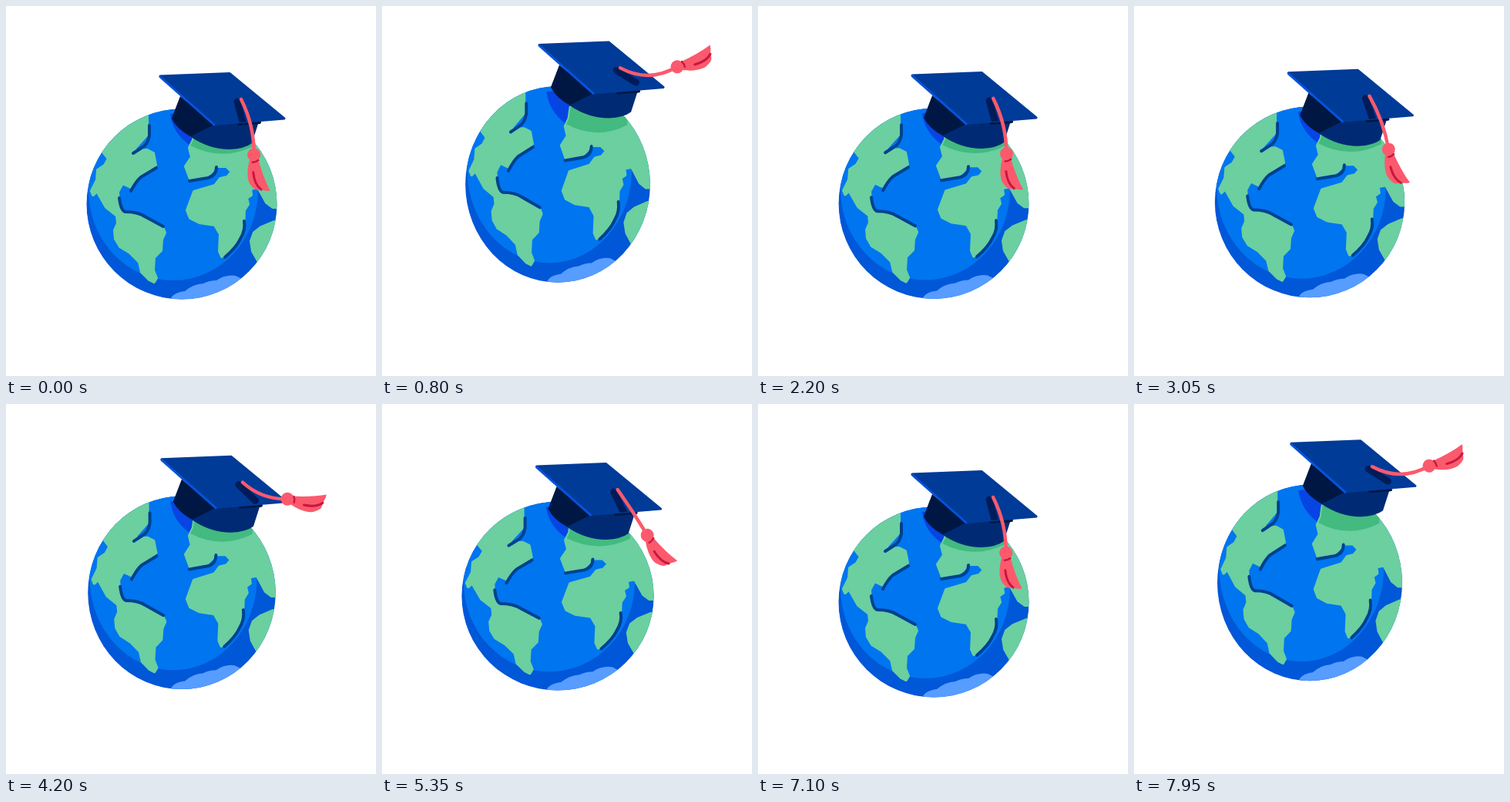
An HTML page that plays this animation: 480x480 px, repeating every 8000 ms.

```html
<!DOCTYPE html>
<html lang="en">
<head>
<meta charset="utf-8">
<title>Globe with graduation cap</title>
<style>
  html, body { margin: 0; width: 100%; height: 100%; overflow: hidden; background: #fff; }
  svg { display: block; width: 100vw; height: 100vh; }
  .line { fill: none; stroke-linecap: round; stroke-linejoin: round; }
  .coast { stroke: #00418f; stroke-width: 4; }
  .land { fill: #6bcfa0; stroke: #6bcfa0; stroke-width: 4; stroke-linejoin: round; }
</style>
</head>
<body>
<svg viewBox="0 0 480 480">
  <defs>
    <path id="eurasia" d="M245 160 243 174 238 184 241 196 233 208 239 224 261 220 274 208H286L293 215
      287 222 278 224 271 233 244 241 235 265 239 275 251 281 271 284 278 296 277 318 280 325 285 323
      301 302 308 288 309 265 314 257 312 249 318 245 317 237 327 235 338 255 346 261H370V130Z"/>
    <path id="capShade" d="M213 140Q216 165 239 181Q280 202 321 182V140Z"/>
    <clipPath id="disc"><circle cx="228" cy="257" r="123.5"/></clipPath>
    <clipPath id="eastClip"><use href="#eurasia"/></clipPath>
    <clipPath id="boardClip"><path d="M199 90 290 86 362 146 270 154Z"/></clipPath>
  </defs>

  <g id="globe"><g clip-path="url(#disc)">
    <circle cx="228" cy="257" r="124" fill="#0057d8"/>
    <ellipse cx="217" cy="239" rx="110" ry="117" fill="#0075f0"/>
    <use href="#capShade" fill="#0645e4"/>
    <path class="land" d="M183 135V167L164 188 183 187 191 191 194 206 173 220 162 235 151 230 145 241
      146 256 152 268 178 274 203 287 206 294 202 303 201 317 192 326 191 343 195 353 192 358 186 355
      176 345 173 332 161 320 148 312 142 302 141 291 145 282 144 272 130 261 122 247 118 240 113 245
      111 240 118 226 119 213 128 207 133 198 125 188 100 170 150 115Z"/>
    <use href="#eurasia" class="land"/>
    <path class="land" d="M348 280 331 287 322 294 318 305 320 318 328 332H370V280Z"/>
    <path fill="#579cff" d="M213 382Q215 372 232 370Q242 361 256 360Q264 356 273 356Q285 348 298 350L306 354V390H213Z"/>
    <use href="#capShade" fill="#43ba7f" clip-path="url(#eastClip)"/>
    <g class="line coast">
      <path d="M186 155V168Q184 180 176 184L165 191"/>
      <path d="M195 210 175 222Q169 227 162 240"/>
      <path d="M147 249Q149 266 155 267Q171 267 180 273L204 286"/>
      <path d="M238 227 262 223Q273 220 273 209"/>
      <path d="M284 326Q299 313 304 302Q311 291 309 279"/>
    </g>
  </g></g>

  <g id="cap">
    <path d="M226 118 215 146Q222 160 240 170Q264 186 290 186Q310 185 319 178L328 150 270 150Z" fill="#002b74"/>
    <path d="M226 117 215 146Q222 160 240 169L270 154Z" fill="#001744"/>
    <path class="line" d="M302 153 329 151" stroke="#001744" stroke-width="4"/>
    <path d="M200 91 290 87.5 361 146 270 153.5Z" fill="#003b98" stroke="#003b98" stroke-width="3" stroke-linejoin="round"/>
    <path class="line" d="M200 92 270 154" stroke="#0653dc" stroke-width="3"/>
    <g clip-path="url(#boardClip)">
      <path id="cordShade" class="line" stroke="#001c58" stroke-width="9"/>
    </g>
    <path id="cord" class="line" stroke="#fb5a6c" stroke-width="4.5"/>
    <g id="tassel">
      <path d="M-6 4C-12 13-17 29-13 37Q-10 44-7 45L1 47Q6 50 10 50Q5 32 4 4Z" fill="#fb5a6c"/>
      <path class="line" d="M-6 22Q-8 38-1 46" stroke="#c9163f" stroke-width="3"/>
      <circle r="8.5" fill="#fb5a6c"/>
      <path class="line" d="M-4 9Q0 10 4 8" stroke="#c9163f" stroke-width="2.4"/>
    </g>
  </g>
</svg>

<script>
const LOOP = 8000;
const LAPS = [0, 3665, 7140];
const BOUNCES = [
  { start: 395,  peak: 705,  end: 1180, height: 45 },
  { start: 1480, peak: 1880, end: 2260, height: 19 },
  { start: 2330, peak: 2790, end: 3260, height: 10 }
];
const RADIUS = 123.5;

const $ = selector => document.querySelector(selector);
const setAttr = (selector, name, value) => $(selector).setAttribute(name, value);
const clamp01 = x => Math.min(1, Math.max(0, x));
const ease = (from, to, t) => (1 - Math.cos(Math.PI * clamp01((t - from) / (to - from)))) / 2;
const bump = (from, peak, to, t) => ease(from, peak, t) * ease(to, peak, t);
const rad = degrees => degrees * Math.PI / 180;

function draw(t) {
  const time = t - LAPS.filter(start => start <= t).pop();
  const lift = BOUNCES.reduce((sum, b) => sum + b.height * bump(b.start, b.peak, b.end, time), 0);
  const squash = bump(950, 1500, 2050, time);

  // The globe grows taller with height and flattens after the first landing.
  const stretch = 1 + (2.7 * squash - 0.09 * lift) / RADIUS;
  const centre = 257 - 0.63 * lift - 2.2 * squash;
  setAttr('#globe', 'transform',
    `translate(228 ${centre}) scale(${stretch} ${1 / stretch}) translate(-228 -257)`);
  setAttr('#cap', 'transform', `translate(${0.1 * lift - 0.5 * squash} ${-lift})`);

  // The tassel is flung outwards by height and sways back before the last bounce.
  const fling = 88 * lift ** 2 / (lift ** 2 + 206) * (1 - 0.4 * squash);
  const sway = 10 * bump(2300, 2535, 2790, time);
  const cordAngle = 13 + fling - sway;
  const tailAngle = 13 + 1.27 * (fling - sway) - sway;
  const length = 74 - 12 * Math.exp(-(((lift - 19) / 8) ** 2));

  const sin = Math.sin(rad(cordAngle)), cos = Math.cos(rad(cordAngle));
  const x = 305 + length * sin, y = 121 + length * cos;
  const bow = 14 - 0.38 * cordAngle;
  setAttr('#cord', 'd',
    `M305 121Q${(305 + x) / 2 + bow * cos} ${(121 + y) / 2 - bow * sin} ${x} ${y}`);
  setAttr('#tassel', 'transform', `translate(${x} ${y}) rotate(${-tailAngle})`);

  const shade = rad(cordAngle * 0.55 + 8);
  setAttr('#cordShade', 'd', `M300 124l${30 * Math.sin(shade)} ${30 * Math.cos(shade)}`);
}

function frame() {
  draw(performance.now() % LOOP);
  requestAnimationFrame(frame);
}
frame();
</script>
</body>
</html>
```
